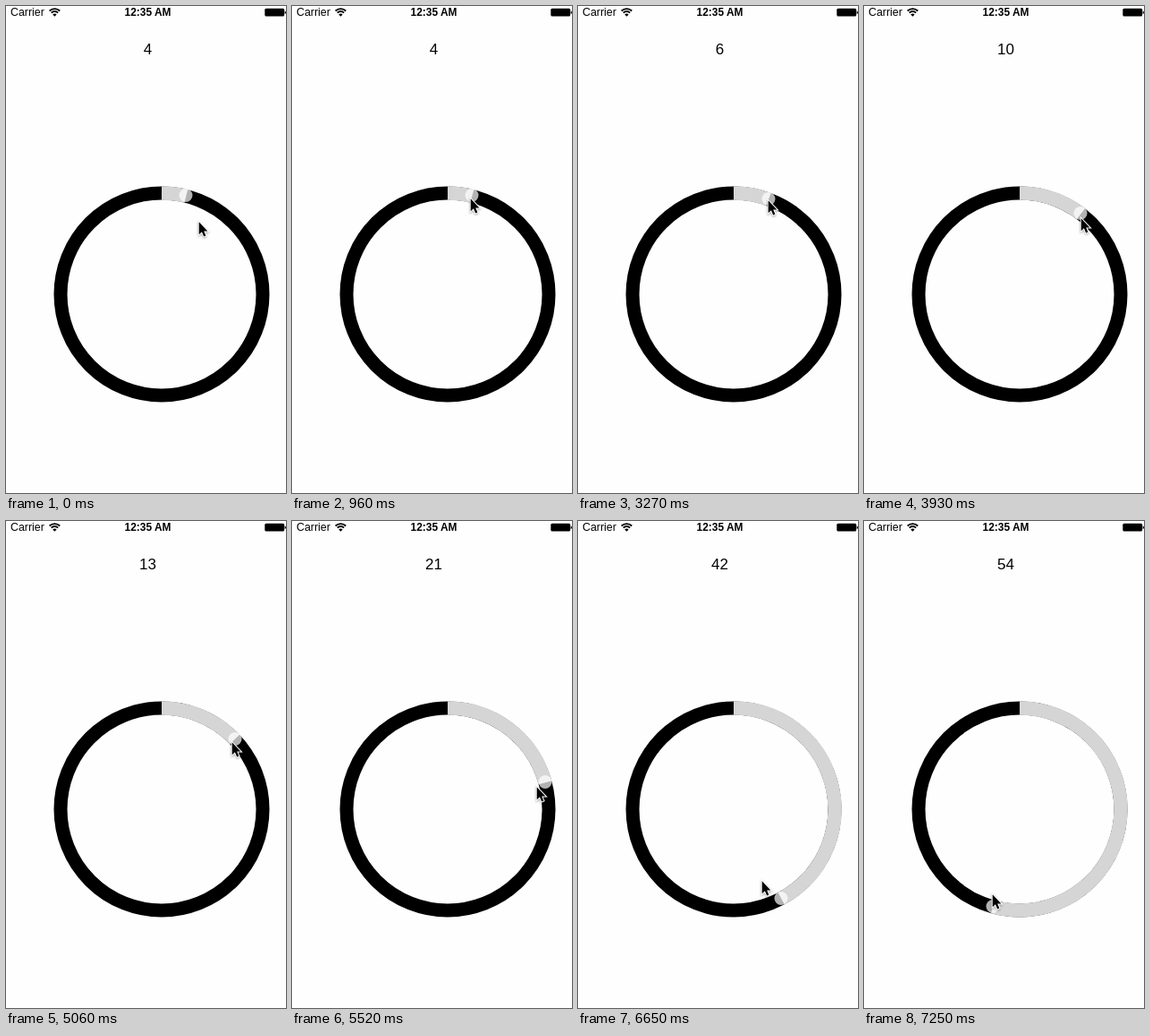
An HTML page for the animation above (8 s loop, 313x544 px).

```html
<!DOCTYPE html>
<html lang="en">
<head>
<meta charset="utf-8">
<title>Circular slider</title>
<style>
html, body { margin: 0; width: 313px; height: 544px; overflow: hidden; background: #fefefe; }
svg { display: block; font-family: "Liberation Sans", Arial, sans-serif; }
#cursor { paint-order: stroke; filter: drop-shadow(0 1px 1px rgba(0, 0, 0, .35)); }
</style>
</head>
<body>
<svg width="313" height="544" viewBox="0 0 313 544">
  <text x="5" y="11" font-size="12.4">Carrier</text>
  <g fill="none" stroke="#000" stroke-width="1.9">
    <path d="M48.6 5.5A8.2 8.2 0 0 1 60.2 5.5"/>
    <path d="M50.7 7.6A5.2 5.2 0 0 1 58.1 7.6"/>
  </g>
  <path d="M54.4 11.7L52.2 9.5A3.1 3.1 0 0 1 56.6 9.5Z"/>
  <text x="158.5" y="11" font-size="11.9" font-weight="bold" text-anchor="middle">12:35 AM</text>
  <rect x="289.3" y="2.7" width="21.8" height="8.8" rx="1.5"/>
  <path d="M311.6 5.4q1.4 .3 1.4 1.8t-1.4 1.8z"/>
  <text id="value" x="158.5" y="54" font-size="17" text-anchor="middle"></text>
  <circle cx="174" cy="322" r="113" fill="none" stroke="#000" stroke-width="15"/>
  <path id="arc" fill="none" stroke="#d5d5d5" stroke-width="15.4"/>
  <circle id="knob" r="7.5" fill="#fff" fill-opacity=".7"/>
  <path id="cursor" d="M.7 1.3V15.3L3.9 12.3L6.2 17.4L8.4 16.5L6.2 11.4H10.4Z" stroke="#fff" stroke-width="2"/>
</svg>
<script>
const LOOP = 8000, STEP = 60, CX = 174, CY = 322, R = 113;
const $ = id => document.getElementById(id);

// Poses: knob angle, cursor angle, cursor radius
const away = [14, 26.3, 91.5], near = [14, 12.7, 107], grab = [14, 13.2, 114];
const pause = [46.3, 45.9, 109];
const moves = [
  { from: 450, to: 720, a: away, b: near },
  { from: 720, to: 1140, a: near, b: grab },
  { from: 3030, to: 3930, a: grab, b: [37.3, 38.3, 109.6] },
  { from: 3930, to: 4220, a: [37.3, 38.3, 109.6], b: pause },
  { from: 5030, to: 5870, a: pause, b: [96.1, 97, 96.7] },
  { from: 5870, to: 6650, a: [96.1, 97, 96.7], b: [151.9, 158.6, 85] },
  { from: 6650, to: 7250, a: [151.9, 158.6, 85], b: [195.4, 198.5, 99] }
];

// The latest move that has begun, held at its end
function poseAt(t) {
  const { from, to, a, b } = moves.filter(m => m.from <= t).pop() || moves[0];
  const u = Math.min(1, Math.max(0, (t - from) / (to - from)));
  return a.map((v, i) => v + (b[i] - v) * u);
}

function polar(deg, r) {
  const a = deg * Math.PI / 180;
  return [CX + r * Math.sin(a), CY - r * Math.cos(a)];
}

function draw(now) {
  const time = now % LOOP, phase = time < 5000 ? 30 : 50;
  const t = Math.floor((time - phase) / STEP) * STEP + phase;
  const [angle, cursorAngle, cursorR] = poseAt(t);
  const [x, y] = polar(angle, R);

  $("value").textContent = Math.round(angle / 3.6);
  $("arc").setAttribute("d", `M${CX} ${CY - R}A${R} ${R} 0 ${angle > 180 ? 1 : 0} 1 ${x} ${y}`);
  $("knob").setAttribute("cx", Math.round(x));
  $("knob").setAttribute("cy", Math.round(y) - 0.5);
  $("cursor").setAttribute("transform", `translate(${polar(cursorAngle, cursorR).map(Math.round)})`);
}

function frame() {
  draw(performance.now());
  requestAnimationFrame(frame);
}
frame();
</script>
</body>
</html>
```
